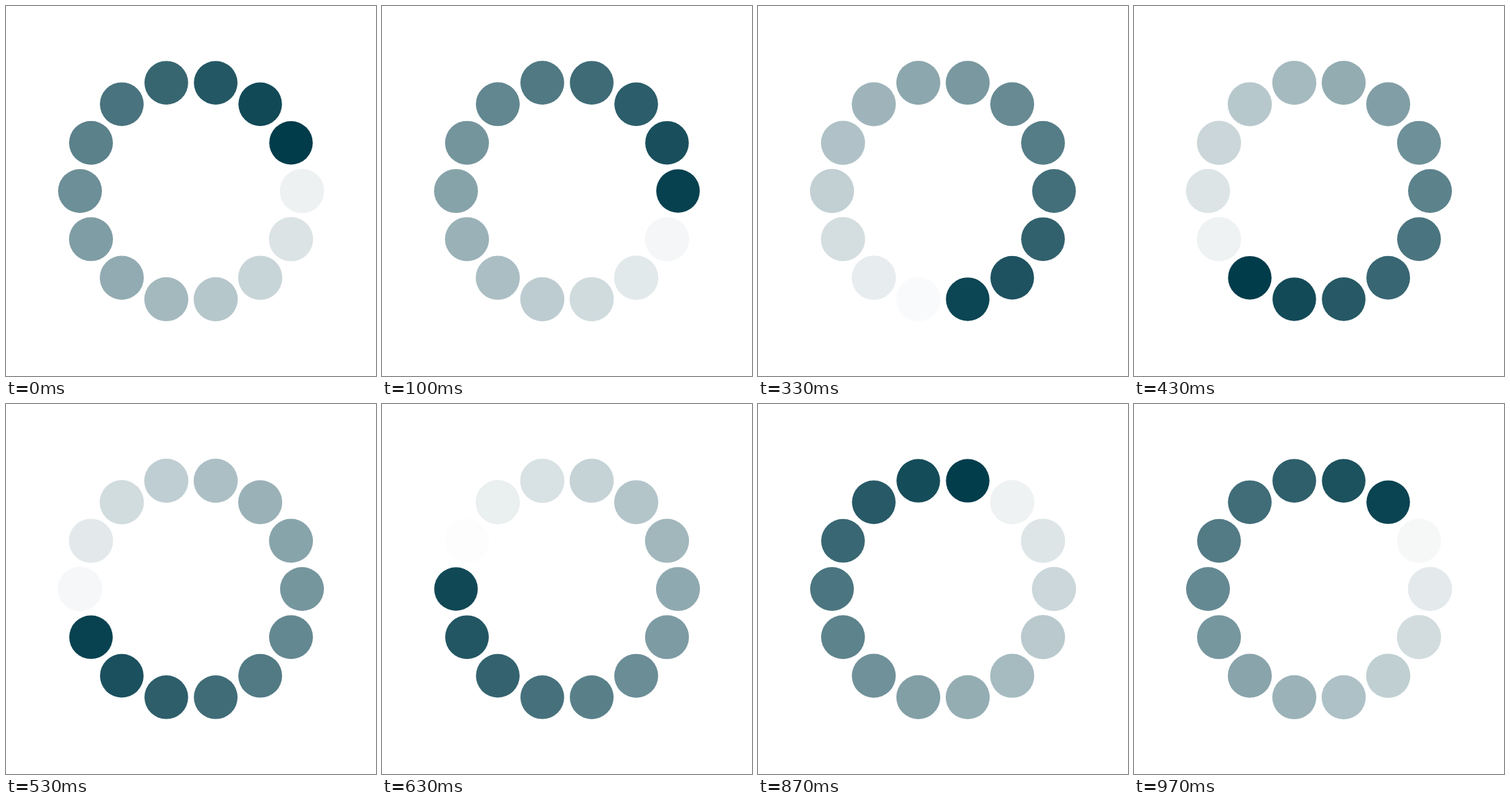
Animation, 540 px wide and 540 px high, one loop 1000 ms. Source, as an HTML page:

```html
<!DOCTYPE html>
<html lang="en">
<head>
<meta charset="utf-8">
<title>Spinner</title>
<style>
  html, body { margin: 0; height: 100%; overflow: hidden; background: #fff; }
  svg { display: block; width: 100%; height: 100%; }
</style>
</head>
<body>
<svg viewBox="0 0 540 540" fill="#013c4b"></svg>
<script>
const COUNT = 14, RING = 162, RADIUS = 32.4, FPS = 30, LOOP = 1000;
const svg = document.querySelector('svg');

const dots = Array.from({ length: COUNT }, (_, i) => {
  const angle = i / COUNT * 2 * Math.PI;
  const dot = document.createElementNS('http://www.w3.org/2000/svg', 'circle');
  dot.setAttribute('cx', 270 + RING * Math.cos(angle));
  dot.setAttribute('cy', 270 + RING * Math.sin(angle));
  return svg.appendChild(dot);
});

// Steps of 1/30 s, with their start times rounded to 10 ms
function stepTime(ms) {
  return Math.floor((Math.floor(ms / 10) + 0.5) * FPS / 100) / FPS;
}

// Each dot lights up in turn, then fades out and grows slightly
function draw(ms) {
  const t = stepTime(ms % LOOP);
  dots.forEach((dot, i) => {
    const age = (t + 1 - (i + 1) / COUNT) % 1;
    dot.setAttribute('fill-opacity', 1 - age);
    dot.setAttribute('r', RADIUS * (0.98 + 0.02 * age));
  });
}

const start = performance.now();
function tick() {
  draw(performance.now() - start);
  requestAnimationFrame(tick);
}
tick();
</script>
</body>
</html>
```
